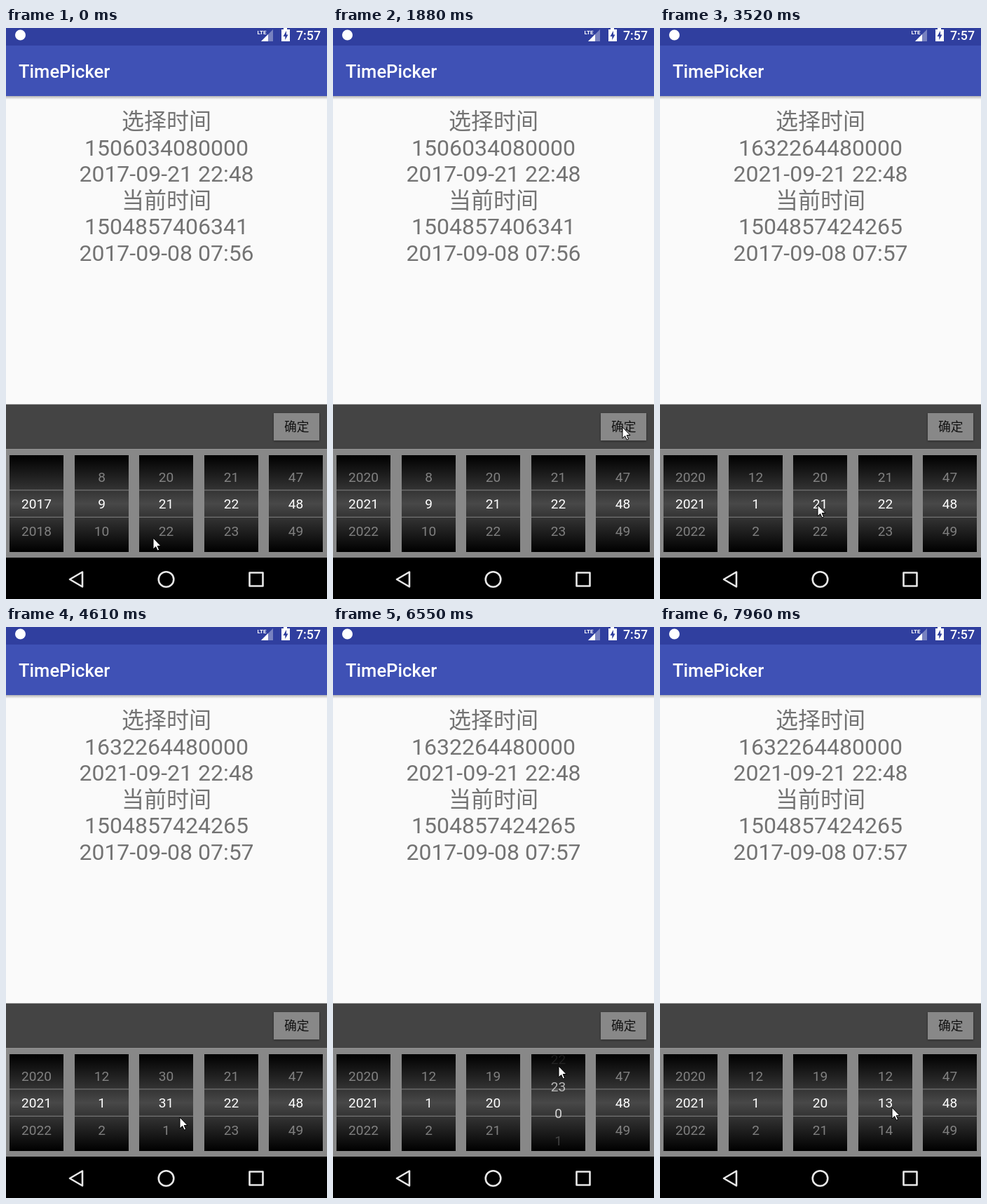
An HTML page with a canvas for the animation above (8 s loop, 458 px wide and 814 px high).

```html
<!DOCTYPE html>
<html lang="zh-CN">
<head>
<meta charset="utf-8">
<title>TimePicker</title>
<style>
  html, body { margin: 0; width: 100%; height: 100%; overflow: hidden; background: #000; }
  canvas { display: block; width: 458px; height: 814px; }
</style>
</head>
<body>
<canvas id="stage" width="458" height="814"></canvas>
<script>
const ctx = document.getElementById('stage').getContext('2d');
const FONT = 'Roboto, "Noto Sans CJK SC", "Noto Sans CJK", sans-serif';
const LOOP = 8000, REFRESH = 78, CONFIRMED = 2180;
const ROW = 38.5, MID = 678, WHEEL_TOP = 609, WHEEL_W = 77, WHEEL_H = 138;

// The pointer glides to each stop, rests briefly, then drags a wheel up or waits.
const REST = 92, DRIFT = 14;
const STOPS = [
  { at: 0, time: 50, x: 210, y: 727 },
  { at: 160, time: 0, x: 183, y: 668 },
  { at: 640, time: 450, x: 41, y: 702, wheel: 'year', rows: 4 },
  { at: 1960, time: 300, x: 413, y: 569 },
  { at: 2890, time: 320, x: 136, y: 690, wheel: 'month', rows: 4 },
  { at: 3595, time: 235, x: 225, y: 680, wheel: 'day', rows: 5 },
  { at: 4140, time: 235, x: 244, y: 692, wheel: 'day', rows: 5 },
  { at: 4690, time: 465, x: 248, y: 699, wheel: 'day', rows: 13 },
  { at: 5550, time: 315, x: 235, y: 651, wheel: 'day', rows: 7 },
  { at: 6400, time: 460, x: 319, y: 688, wheel: 'hour', rows: 7 },
  { at: 7250, time: 390, x: 325, y: 717, wheel: 'hour', rows: 8 },
  { at: LOOP + 40, time: 0, x: 331, y: 685 }
];

// A wheel without a count does not wrap.
const WHEELS = [
  { name: 'year', min: 2017, start: 2017 },
  { name: 'month', min: 1, count: 12, start: 9 },
  { name: 'day', min: 1, count: 31, start: 21 },
  { name: 'hour', min: 0, count: 24, start: 22 },
  { name: 'minute', min: 0, count: 60, start: 48 }
];

const CHOSEN = ['1506034080000', '2017-09-21 22:48'];
const CHOSEN_NEW = ['1632264480000', '2021-09-21 22:48'];
const CURRENT = ['1504857406341', '2017-09-08 07:56'];
const CURRENT_NEW = ['1504857424265', '2017-09-08 07:57'];

const clamp = v => Math.min(1, Math.max(0, v));
const easeOut = p => 1 - (1 - p) ** 3;
const mix = (a, b, k) => a + (b - a) * k;

const dragged = (stop, t) => stop.rows ? clamp((t - stop.at) / stop.time) ** 1.3 : 0;

function onStop(stop, t) {
  const k = dragged(stop, t);
  return { x: stop.x + DRIFT * k, y: stop.y - (stop.rows || 0) * ROW * k };
}

function pointerAt(t) {
  const i = STOPS.findIndex(s => t < s.at + s.time || s.at > LOOP);
  const stop = STOPS[i];
  if (t >= stop.at) return onStop(stop, t);
  const prev = STOPS[i - 1], leave = prev.at + prev.time;
  const from = onStop(prev, leave);
  const k = easeOut(clamp((t - leave) / (stop.at - REST - leave)));
  return { x: mix(from.x, stop.x, k), y: mix(from.y, stop.y, k) };
}

function wheelValue(wheel, t) {
  return STOPS.filter(s => s.wheel === wheel.name)
    .reduce((sum, s) => sum + s.rows * dragged(s, t), wheel.start);
}

function rect(x, y, w, h, color) {
  ctx.fillStyle = color;
  ctx.fillRect(x, y, w, h);
}

function shape(points, color) {
  ctx.beginPath();
  points.forEach(([x, y]) => ctx.lineTo(x, y));
  ctx.closePath();
  if (color) {
    ctx.fillStyle = color;
    ctx.fill();
  }
}

function circle(x, y, r) {
  ctx.beginPath();
  ctx.arc(x, y, r, 0, Math.PI * 2);
}

function fade(y, h, ...colors) {
  const g = ctx.createLinearGradient(0, y, 0, y + h);
  colors.forEach((c, i) => g.addColorStop(i / (colors.length - 1), c));
  return g;
}

function label(str, x, y, size, color, align = 'center', weight = 400) {
  ctx.font = `${weight} ${size}px ${FONT}`;
  ctx.textAlign = align;
  ctx.fillStyle = color;
  ctx.fillText(str, x, y);
}

function drawBars() {
  rect(0, 97, 458, 5, fade(97, 5, 'rgba(0,0,0,.28)', 'rgba(0,0,0,0)'));
  rect(0, 25, 458, 72, '#3f51b5');
  rect(0, 0, 458, 25, '#303f9f');
  label('TimePicker', 18, 71, 25.6, '#fff', 'left', 500);
  label('7:57', 449, 17, 17.8, '#fff', 'right', 500);

  ctx.fillStyle = '#fff';
  circle(20.5, 10, 7.5);
  ctx.fill();

  shape([[381, 2], [381, 19], [364, 19]], 'rgba(255,255,255,.35)');
  shape([[374, 9], [374, 19], [364, 19]], '#fff');
  label('LTE', 365, 8.5, 8, '#fff', 'center', 700);

  rect(396, 0, 5, 3, '#fff');
  rect(393, 2, 12, 17, '#fff');
  shape([[400, 4], [395.5, 12], [398.3, 12], [398.3, 17], [402.5, 9.5], [400, 9.5]], '#303f9f');
}

function drawText(t) {
  const done = t >= CONFIRMED;
  const lines = ['选择时间', ...(done ? CHOSEN_NEW : CHOSEN),
                 '当前时间', ...(done ? CURRENT_NEW : CURRENT)];
  lines.forEach((line, i) => label(line, 229, 144.4 + i * 37.5, 32, '#737373'));
}

function drawWheel(wheel, i, t) {
  const { min, count } = wheel;
  const x = Math.round(5.3 + i * 92.4);
  const value = wheelValue(wheel, t), base = Math.round(value);
  rect(x, WHEEL_TOP, WHEEL_W, WHEEL_H, fade(WHEEL_TOP, WHEEL_H, '#000', '#484848', '#000'));
  for (const side of [-1, 1]) rect(x, MID - 0.5 + side * ROW / 2, WHEEL_W, 1.2, '#777');

  ctx.save();
  ctx.beginPath();
  ctx.rect(x, WHEEL_TOP, WHEEL_W, WHEEL_H);
  ctx.clip();
  for (let n = base - 2; n <= base + 2; n++) {
    const dy = (n - value) * ROW;
    const alpha = 1 - Math.abs(dy) / 68;
    if (alpha <= 0 || (!count && n < min)) continue;
    const shown = count ? (n - min + count) % count + min : n;
    label(shown, x + WHEEL_W / 2, MID + dy + 7, 19.1, `rgba(255,255,255,${alpha})`);
  }
  ctx.restore();
}

function drawPanel(t) {
  rect(0, 536.5, 458, 64, '#444');
  rect(0, 600.5, 458, 155, '#888');
  ctx.save();
  ctx.shadowColor = 'rgba(0,0,0,.4)';
  ctx.shadowBlur = 3;
  ctx.shadowOffsetY = 1;
  rect(382, 549, 65, 39, '#888');
  ctx.restore();
  label('确定', 414.7, 575, 17.8, '#111');
  WHEELS.forEach((wheel, i) => drawWheel(wheel, i, t));
}

function drawNav() {
  rect(0, 755, 458, 59, '#000');
  ctx.strokeStyle = '#e8e8e8';
  ctx.lineWidth = 2.6;
  ctx.lineJoin = 'round';
  shape([[91, 786], [109, 775.5], [109, 796.5]]);
  ctx.stroke();
  circle(228.5, 786, 10.8);
  ctx.stroke();
  ctx.strokeRect(347.5, 776.5, 19, 19);
}

function drawPointer({ x, y }) {
  ctx.save();
  ctx.translate(Math.round(x), Math.round(y));
  shape([[0, 0], [0, 16], [3.7, 12.5], [6.2, 18], [8.6, 17], [6.2, 11.5], [11, 11.5]], '#fff');
  ctx.strokeStyle = '#000';
  ctx.lineWidth = 1;
  ctx.lineJoin = 'miter';
  ctx.stroke();
  ctx.restore();
}

const refreshTime = t => Math.max(0, Math.floor((t + 4) / REFRESH) * REFRESH - 4);

function draw(now) {
  const t = refreshTime(now % LOOP);
  rect(0, 0, 458, 814, '#fafafa');
  drawBars();
  drawText(t);
  drawPanel(t);
  drawNav();
  drawPointer(pointerAt(t));
}

const begin = performance.now();
function tick() {
  draw(performance.now() - begin);
  requestAnimationFrame(tick);
}
tick();
</script>
</body>
</html>
```
